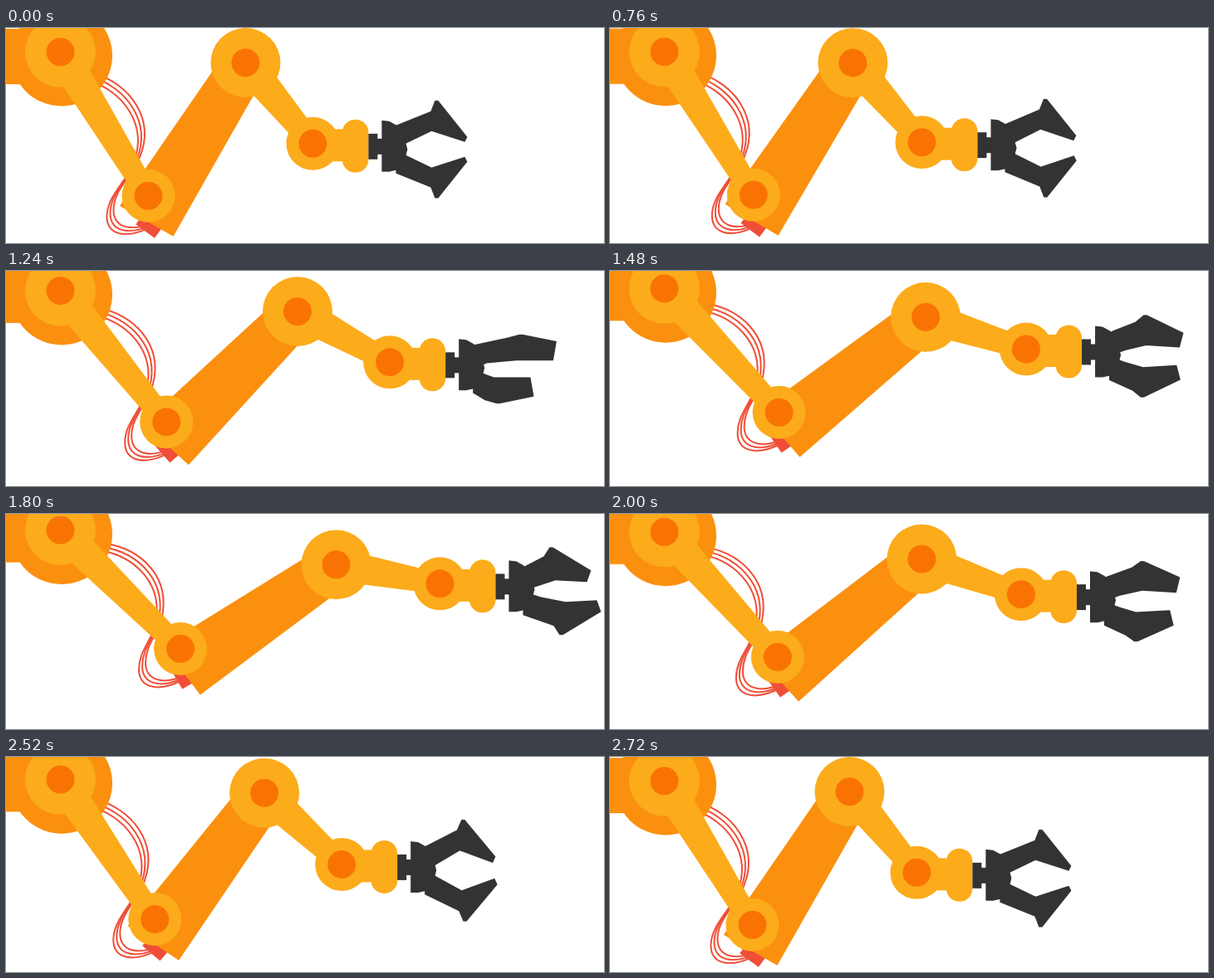
These frames come from a looping animation (720x260 px, 3280 ms). An HTML page with a canvas:

```html
<!DOCTYPE html>
<html lang="en">
<head>
<meta charset="utf-8">
<title>Robot arm</title>
<style>
  html, body { margin: 0; width: 100%; height: 100%; overflow: hidden; background: #fff; }
  canvas { display: block; width: 720px; height: 260px; }
</style>
</head>
<body>
<canvas id="stage" width="720" height="260"></canvas>
<script>
const ctx = document.getElementById('stage').getContext('2d');
const LOOP = 3280, START = 720, STEP = 40, STEPS = 50;
const ORANGE = '#fb900f', LIGHT = '#fcab1a', DEEP = '#f97304', DARK = '#333', RED = '#f04e37';

const lerp = (a, b, p) => a + (b - a) * p;
const clamp = v => Math.min(1, Math.max(0, v));
const rad = deg => deg * Math.PI / 180;
const polar = ([x, y], len, deg) => [x + len * Math.cos(rad(deg)), y + len * Math.sin(rad(deg))];

function poly(pts, color) {
  ctx.beginPath();
  pts.forEach(([x, y]) => ctx.lineTo(x, y));
  ctx.closePath();
  ctx.fillStyle = color;
  ctx.fill();
}

function disc([x, y], r, color) {
  ctx.beginPath();
  ctx.arc(x, y, r, 0, Math.PI * 2);
  ctx.fillStyle = color;
  ctx.fill();
}

function joint(at, r) {
  disc(at, r, LIGHT);
  disc(at, 17, DEEP);
}

function box(x, y, w, h, color) {
  ctx.fillStyle = color;
  ctx.fillRect(x, y, w, h);
}

// Draws in a frame placed at a point and turned by an angle.
function within([x, y], deg, paint) {
  ctx.save();
  ctx.translate(x, y);
  ctx.rotate(rad(deg));
  paint();
  ctx.restore();
}

const bar = (at, len, deg) => within(at, deg, () =>
  poly([[0, -20], [len, -12.5], [len, 12.5], [0, 20]], LIGHT));

// The upper half swings with the bar, the loop hangs from the elbow.
function cables(shoulder, elbow, swing) {
  const turned = ([ox, oy], x, y) => {
    const c = Math.cos(rad(swing)), s = Math.sin(rad(swing));
    return [ox + x * c - y * s, oy + x * s + y * c];
  };
  const hung = (x, y) => [elbow[0] + x, elbow[1] + y];
  const cross = turned(elbow, -10, -48);
  ctx.strokeStyle = RED;
  ctx.lineWidth = 2;
  for (let i = 0; i < 3; i++) {
    within([-4 * i, 4 * i], 0, () => {
      ctx.beginPath();
      ctx.moveTo(...turned(shoulder, 41, 26));
      ctx.bezierCurveTo(...turned(shoulder, 84, 39), ...turned(elbow, 8, -93), ...cross);
      ctx.bezierCurveTo(...turned(elbow, -18, -25), ...hung(-42, -8), ...hung(-42, 17));
      ctx.bezierCurveTo(...hung(-42, 37), ...hung(-23, 45), ...hung(6, 32));
      ctx.stroke();
    });
  }
}

function forearm(at, deg) {
  within(at, deg, () => {
    box(212, -36, 24, 28, RED);
    poly([[0, 27], [0, -28], [221, -53], [229, 21]], ORANGE);
  });
}

// One jaw, outward distances measured from the grip axis.
function jaw(side, p, shut) {
  const axis = 7 + 2 * p, flare = 24 * p * (1 - p);
  const slide = side * (6 * p - 17 * shut);
  const at = (x, out) => [x + slide, axis + side * out];
  const heel = [147 - 9 * p, 59 - 6 * p + flare - 20 * shut];
  poly([
    [100, axis + side * 29],
    at(142 - 11 * p - 8 * shut, 46 - 4 * p + flare - 12 * shut),
    at(...heel),
    at(heel[0] + 4, heel[1]),
    at(186 + 2 * p, 15 + 10 * p + 13 * shut),
    at(183, 9 + 2 * p),
    at(143 + 2 * p - 5 * shut, 22 - 9 * p + flare - 13 * shut),
    [lerp(112, 121, p), axis + side * 7],
    [100, axis]
  ], DARK);
}

function hand(at, p) {
  // The jaws shut half way and open again.
  const shut = clamp(Math.min((p - .2) / .34, (1 - p) / .46));
  within(at, 0, () => {
    box(0, -17.5, 45, 39, LIGHT);
    ctx.beginPath();
    ctx.roundRect(35.5, -29, 31.5, 64, 15.5);
    ctx.fill();
    joint([0, 0], 32);
    box(67, -12, 11, 31, DARK);
    box(76, -6, 10, 19, DARK);
    poly([[83, -28], [92, -27], [101, -22], [112, -1], [114, 7], [112, 15], [101, 32], [92, 34], [83, 34]], DARK);
    jaw(-1, p, shut);
    jaw(1, p, shut);
  });
}

function draw(p) {
  const a1 = lerp(58.65, 44.8, p), a2 = lerp(-54, -28.5, p), a3 = lerp(50.4, 10.5, p);
  const shoulder = [65.5, lerp(29, 19.5, p)];
  const elbow = polar(shoulder, 203.7, a1);
  const top = polar(elbow, lerp(199, 213.4, p), a2);
  const wrist = polar(top, 127, a3);

  box(0, 0, 720, 260, '#fff');
  cables(shoulder, elbow, a1 - 58.65);
  box(0, shoulder[1] - 28, 20, 67, ORANGE);
  disc([67, shoulder[1] + 4.5], 61, ORANGE);
  forearm(top, lerp(126, 149.6, p));
  bar(shoulder, 203.7, a1);
  joint(shoulder, 42.5);
  joint(elbow, 32);
  bar(top, 127, a3);
  joint(top, 42);
  hand(wrist, p);
}

const t0 = performance.now();
function tick() {
  const t = (performance.now() - t0) % LOOP;
  const k = Math.min(STEPS, Math.max(0, Math.floor((t - START) / STEP)));
  // Reach out, rest at full stretch, come back the same way.
  draw(clamp((Math.min(k, STEPS - k) / 22.8) ** 1.1));
  requestAnimationFrame(tick);
}
tick();
</script>
</body>
</html>
```
